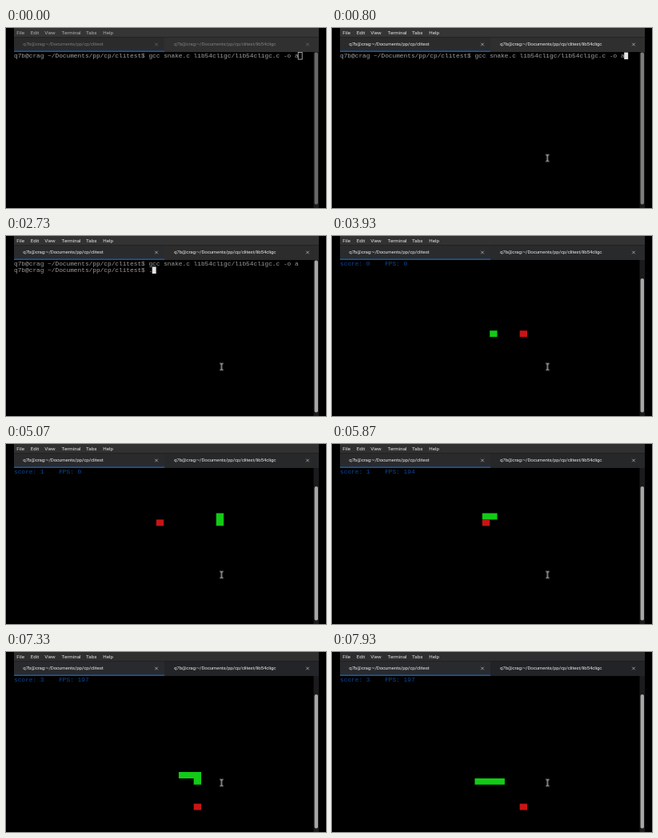
Recreate the animation shown at these times as an HTML page. Size 400x225 px, loop 8000 ms.

```html
<!DOCTYPE html>
<html lang="en">
<head>
<meta charset="utf-8">
<title>Terminal snake</title>
<style>
  html, body { margin: 0; width: 100%; height: 100%; overflow: hidden; background: #000; }
  svg { display: block; width: 100vw; height: 100vh; }
  text { white-space: pre; }
  .ui { font: 6.2px Roboto, "Liberation Sans", sans-serif; fill: #e6e6e6; }
  .label { letter-spacing: -.17px; }
  .mono { font: 7.8px "Liberation Mono", "DejaVu Sans Mono", monospace; fill: #8e8e8e; }
  .score { fill: #0b489c; }
  .close { stroke: #c4c4c4; stroke-width: .7; }
  .bar { --idle: #353535; fill: #2e2e30; }
  .tab { --idle: #2b2b2c; fill: #292a2d; }
  .back { --idle: #303031; fill: #222326; }
  .line { fill: #1d5799; }
  .thumb { fill: #a6a6a6; animation: thumb 8s linear infinite; }
  .menu { --dim: .7; }
  .label { --dim: .42; }
  .menu, .label { animation: text-focus 8s linear infinite; }
  .shell-text { --idle: #a4a4a4; }
  .bar, .tab, .back, .shell-text { animation: fill-focus 8s linear infinite; }
  .mouse { animation: mouse 8s linear infinite; }
  @keyframes text-focus {
    0%, 3.3% { opacity: var(--dim); }
    5.9%, 100% { opacity: 1; }
  }
  @keyframes fill-focus {
    0%, 3.3% { fill: var(--idle); }
    5.9% { }
  }
  @keyframes thumb {
    0%, 3.3% { opacity: .56; }
    10% { opacity: .7; }
    11.6%, 100% { opacity: 1; }
  }
  @keyframes mouse {
    0%, 5.8% { opacity: 0; transform: translate(264px, 153px); }
    5.9% { opacity: 1; transform: translate(264px, 153px); animation-timing-function: ease-out; }
    9.8% { transform: translate(269.3px, 162.4px); }
    11.6%, 100% { opacity: 1; transform: translate(269.4px, 163.4px); }
  }
</style>
</head>
<body>
<svg viewBox="0 0 400 225" preserveAspectRatio="none">
  <rect width="400" height="225"/>
  <rect class="bar" x="10" width="381" height="11.5"/>
  <rect class="tab" x="10" y="11.5" width="188" height="18.5"/>
  <rect class="back" x="198" y="11.5" width="193" height="18.5"/>
  <rect class="line" x="10" y="28.4" width="188" height="1.6"/>
  <g class="ui menu">
    <text x="13.3" y="7.6">File</text>
    <text x="30.8" y="7.6">Edit</text>
    <text x="48.2" y="7.6">View</text>
    <text x="69.6" y="7.6">Terminal</text>
    <text x="100" y="7.6">Tabs</text>
    <text x="121.3" y="7.6">Help</text>
  </g>
  <g class="ui label">
    <text x="21.3" y="22.4">q7b@crag:~/Documents/pp/cp/clitest</text>
    <text x="210" y="22.4">q7b@crag:~/Documents/pp/cp/clitest/lib54cligc</text>
    <path class="close" d="M186.2 18.7l3.6 3.6m0-3.6l-3.6 3.6M375.2 18.7l3.6 3.6m0-3.6l-3.6 3.6"/>
  </g>
  <rect x="384.5" y="30" width="6.5" height="195" fill="#1b1b1d"/>
  <rect id="thumb" class="thumb" x="385.6" width="4.4" rx="2"/>

  <g id="shell">
    <text id="row0" class="mono shell-text" x="10" y="37.3"></text>
    <text id="row1" class="mono shell-text" x="10" y="45.2"></text>
    <rect id="caret" width="5" height="8.6"/>
  </g>
  <g id="game">
    <text id="status" class="mono score" x="10" y="36.9"></text>
    <path id="snake" fill="#12cb16"/>
    <path id="food" fill="#c81416"/>
  </g>
  <g class="mouse">
    <path d="M-2.2-4.2Q0-4.2 0-3Q0-4.2 2.2-4.2M0-3V3M-2.2 4.2Q0 4.2 0 3Q0 4.2 2.2 4.2" fill="none" stroke="#c4c4c4" stroke-width="1.25"/>
  </g>
</svg>
<script>
const LOOP = 8000, COL = 4.68, ROW = 7.93, LEFT = 10, TOP = 31;
const GAME_START = 3270, FIRST_MOVE = 3920, MOVE = 101.4;
const PROMPT = 'q7b@crag ~/Documents/pp/cp/clitest$ ';
const COMMAND = PROMPT + 'gcc snake.c lib54cligc/lib54cligc.c -o a';

// Corners of the snake's route, in cells two columns wide.
const CORNERS = [[19, 11], [27, 11], [27, 7], [19, 7], [19, 15], [24, 15], [24, 16], [17, 16]];
const MEALS = [{ step: 5, cell: [24, 11] }, { step: 21, cell: [19, 8] }, { step: 34, cell: [24, 16] }];
const LAST_FOOD = [24, 20];
const SCORES = [[0, 0], [4326, 1], [5950, 2], [7300, 3]];
const RATES = [[0, 0], [5300, 194], [6300, 192], [7300, 197]];
const TYPED = [[0, null], [1800, ''], [1930, PROMPT], [2730, PROMPT + '.'], [2930, PROMPT + './'], [3130, PROMPT + './a']];

const $ = id => document.getElementById(id);
const latest = (list, t) => list.filter(([at]) => t >= at).pop()[1];
const set = (node, attrs) => Object.entries(attrs).forEach(([k, v]) => node.setAttribute(k, v));
const block = ([x, y]) =>
  `M${LEFT + x * 2 * COL} ${TOP + y * ROW}h${2 * COL}v${ROW}h${-2 * COL}z`;

const route = [CORNERS[0]];
for (const [cx, cy] of CORNERS.slice(1)) {
  let [x, y] = route[route.length - 1];
  while (x !== cx || y !== cy) {
    x += Math.sign(cx - x);
    y += Math.sign(cy - y);
    route.push([x, y]);
  }
}

function drawShell(t) {
  const line = latest(TYPED, t);
  const first = line === null;
  const focused = t >= 330;
  $('row0').textContent = COMMAND;
  $('row1').textContent = first ? '' : line;
  set($('caret'), {
    x: LEFT + (first ? COMMAND : line).length * COL - .5,
    y: TOP + (first ? 0 : ROW) - .5,
    fill: focused ? '#e4e4e4' : 'none',
    stroke: focused ? 'none' : '#c4c4c4',
    'stroke-width': .8
  });
}

function drawGame(t) {
  const step = Math.min(route.length - 1, Math.max(0, Math.floor((t - FIRST_MOVE) / MOVE) + 1));
  const eaten = MEALS.filter(meal => step >= meal.step).length;
  const body = route.slice(Math.max(0, step - eaten), step + 1);
  const food = eaten < MEALS.length ? MEALS[eaten].cell : LAST_FOOD;
  $('snake').setAttribute('d', body.map(block).join(''));
  $('food').setAttribute('d', block(food));
  $('status').textContent = `score: ${latest(SCORES, t)}    FPS: ${latest(RATES, t)}`;
}

function render(t) {
  const playing = t >= GAME_START;
  $('shell').style.display = playing ? 'none' : '';
  $('game').style.display = playing ? '' : 'none';
  const top = playing ? 53 : 30.5;
  set($('thumb'), { y: top, height: 220.5 - top });
  if (playing) drawGame(t); else drawShell(t);
}

let start;
function tick(now) {
  start ??= now;
  render((now - start) % LOOP);
  requestAnimationFrame(tick);
}
render(0);
requestAnimationFrame(tick);
</script>
</body>
</html>
```
